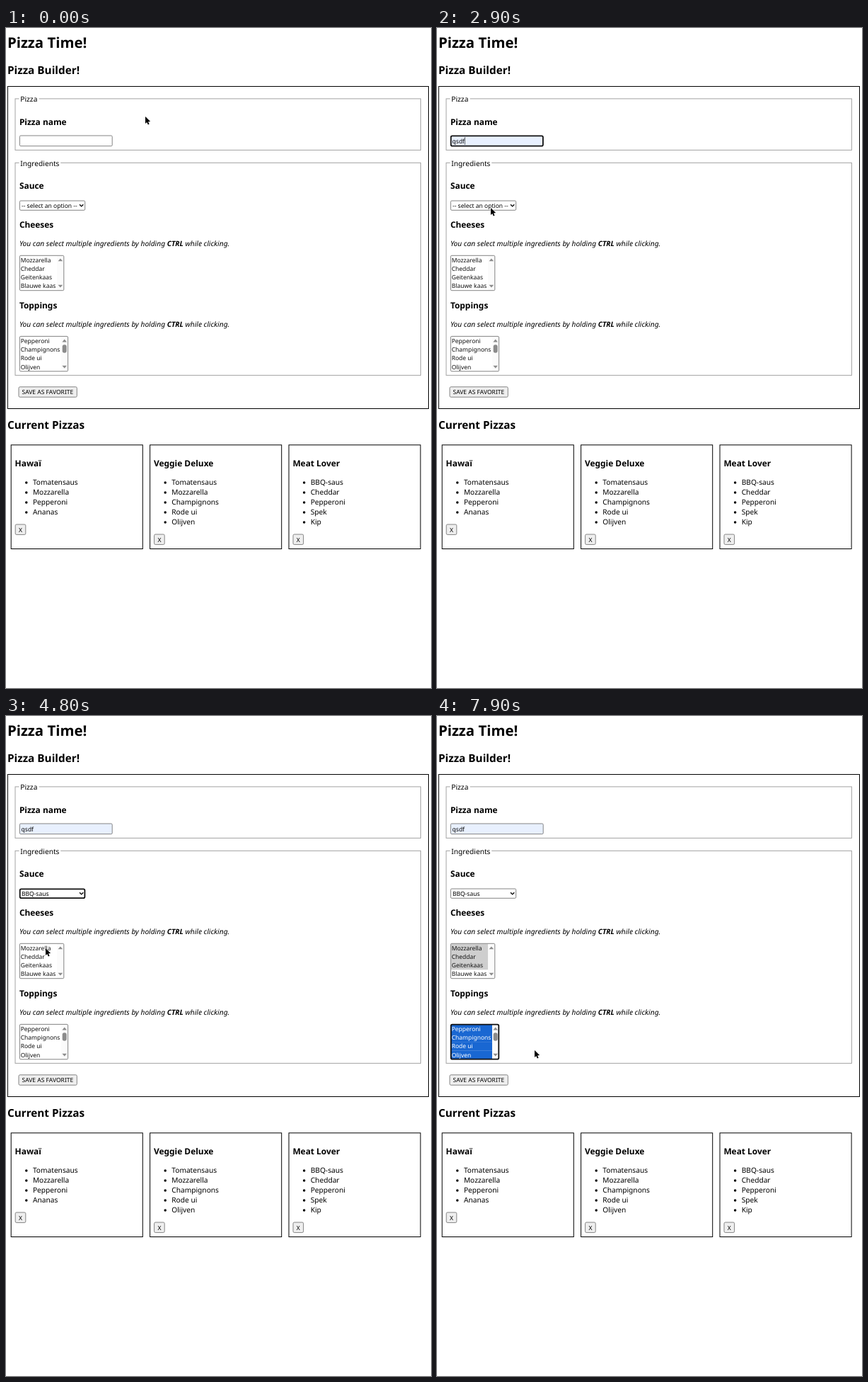
An HTML page that plays this animation: 601x932 px, repeating every 8000 ms.

```html
<!DOCTYPE html>
<html lang="en">
<head>
<meta charset="utf-8">
<title>Pizza Time!</title>
<style>
  html, body { margin: 0; width: 100%; height: 100%; overflow: hidden; background: #fff; }
  svg { display: block; width: 100%; height: 100%; }
  text { font-family: "Noto Sans", "Open Sans", sans-serif; font-size: 10.18px; text-rendering: geometricPrecision; white-space: pre; }
  .h1 { font-size: 20.4px; font-weight: 700; }
  .h2 { font-size: 15.3px; font-weight: 700; }
  .h3 { font-size: 11.92px; font-weight: 700; }
  .ui { font-size: 8.5px; }
  .sug { font-size: 8.95px; font-weight: 500; fill: #1f1f24; }
  .it { font-style: italic; }
  .b { font-weight: 700; }
</style>
</head>
<body>
<svg id="stage" viewBox="0 0 601 932" preserveAspectRatio="none">
  <defs>
    <filter id="shadow" x="-10%" y="-10%" width="120%" height="120%">
      <feDropShadow dx="0" dy="0.8" stdDeviation="1.3" flood-opacity="0.28"/>
    </filter>
  </defs>
  <g id="page"></g>
  <g id="live"></g>
</svg>
<script>
const LOOP = 8000, STEP = 100;
const BLUE = '#1967d2', GREY = '#767676';
const page = document.getElementById('page');
const live = document.getElementById('live');

const text = (x, y, s, cls = '', extra = '') => `<text x="${x}" y="${y}" class="${cls}" ${extra}>${s}</text>`;
const rect = (x, y, w, h, fill, extra = '') => `<rect x="${x}" y="${y}" width="${w}" height="${h}" fill="${fill}" ${extra}/>`;
const box = (x, y, w, h, fill, stroke, rx = 0, sw = 1) =>
  rect(x, y, w, h, fill, `stroke="${stroke}" stroke-width="${sw}" rx="${rx}"`);
const path = (d, extra) => `<path d="${d}" ${extra}/>`;

// Form control frame, with a heavy ring when focused
const control = (x, y, w, h, focused, fill = '#fff') =>
  focused ? box(x + 0.3, y + 0.3, w - 0.6, h - 0.4, fill, '#101010', 1.9, 1.8)
          : box(x, y, w, h, fill, GREY, 1.5, 0.9);

const button = (x, y, w, label, tx) =>
  box(x, y, w, 14.4, '#efefef', GREY, 1.7, 0.9) + text(tx, y + 10.5, label, 'ui');

const fieldset = (y, h, label, gap) =>
  box(13, y, 573.4, h, 'none', '#a3a3a3') + rect(18.6, y - 3, gap, 6, '#fff') + text(20.3, y + 4.2, label);

const hint = y => text(18.9, y,
  'You can select multiple ingredients by holding <tspan class="b">CTRL</tspan> while clicking.', 'it');

function card(i, title, items) {
  const x = 7.2 + i * 196.4;
  const list = items.map((s, n) => {
    const y = 645.4 + n * 14;
    return `<circle cx="${x + 21.6}" cy="${y - 3.4}" r="1.75"/>` + text(x + 30.7, y, s);
  }).join('');
  const by = 645.4 + items.length * 14 - 0.4;
  return box(x, 588.8, 186.1, 146.7, '#fff', '#000') + text(x + 5.4, 619.3, title, 'h3') +
    list + button(x + 6, by, 14.6, 'X', x + 10.8);
}

page.innerHTML =
  text(1.9, 28.2, 'Pizza Time!', 'h1') +
  text(1.9, 64.9, 'Pizza Builder!', 'h2') +
  box(2.4, 82.5, 595.1, 455, '#fff', '#000') +
  fieldset(99.9, 72.5, 'Pizza', 28) +
  fieldset(190.4, 300, 'Ingredients', 58.6) +
  text(18.9, 136.6, 'Pizza name', 'h3') +
  text(18.9, 227.4, 'Sauce', 'h3') +
  text(18.9, 281.6, 'Cheeses', 'h3') + hint(307.9) +
  text(18.9, 395.6, 'Toppings', 'h3') + hint(421.9) +
  button(18, 506.8, 82.3, 'SAVE AS FAVORITE', 22.5) +
  text(1.9, 566.3, 'Current Pizzas', 'h2') +
  card(0, 'Hawaï', ['Tomatensaus', 'Mozzarella', 'Pepperoni', 'Ananas']) +
  card(1, 'Veggie Deluxe', ['Tomatensaus', 'Mozzarella', 'Champignons', 'Rode ui', 'Olijven']) +
  card(2, 'Meat Lover', ['BBQ-saus', 'Cheddar', 'Pepperoni', 'Spek', 'Kip']);

// Pointer track: time, x, y
const track = [
  [400, 197, 125], [500, 160, 138], [600, 103.5, 154], [1700, 103.5, 154],
  [1800, 133, 176], [1900, 153, 193], [2200, 150, 196], [2500, 98, 238],
  [2700, 76, 254], [3000, 76, 254], [3200, 73, 274], [3500, 68, 295],
  [3900, 68, 295], [4300, 62, 313], [4700, 56, 328], [4900, 56, 328],
  [5200, 52, 339], [5500, 50, 352], [5600, 49.5, 355], [5700, 55, 364],
  [6000, 75, 389], [6200, 75, 389], [6300, 75, 408], [6600, 66, 440], [6800, 64, 443],
  [7000, 64, 445], [7200, 62, 453], [7400, 61, 465], [7600, 62, 475],
  [7800, 101.5, 474], [7900, 138, 472]
];

function pointer(t) {
  if (t <= track[0][0]) return track[0].slice(1);
  const i = track.findIndex(p => p[0] >= t);
  const [t0, x0, y0] = track[i - 1], [t1, x1, y1] = track[i];
  const k = (t - t0) / (t1 - t0);
  return [x0 + (x1 - x0) * k, y0 + (y1 - y0) * k];
}

const arrow = (x, y) => path('M0 0V10L2.2 8L3.8 11.6L5.6 10.8L4 7.4L7.1 7.1Z',
  `transform="translate(${x} ${y})" stroke="#fff" stroke-width="1.1" paint-order="stroke" stroke-linejoin="round"`);

const beam = (x, y) => path(
  `M${x - 2.2} ${y - 5.4}H${x - 0.6}L${x} ${y - 4.8}L${x + 0.6} ${y - 5.4}H${x + 2.2}` +
  `M${x} ${y - 4.8}V${y + 5}M${x - 2.2} ${y + 5.5}H${x - 0.6}L${x} ${y + 5}L${x + 0.6} ${y + 5.5}H${x + 2.2}`,
  'fill="none" stroke="#333" stroke-width="0.9"');

function nameField(t) {
  const focused = t >= 700 && t < 3000, filled = t >= 1900;
  let s = control(19.4, 152, 130.8, 14.7, focused, filled ? '#e8f0fe' : '#fff');
  if (filled) s += text(21.6, 162.6, 'qsdf', 'ui');
  if (focused && (t < 1800 || t >= 2200)) s += rect(filled ? 39.1 : 21.9, 154, 0.7, 10.8, '#333');
  return s;
}

function suggestions(t) {
  if (t < 900 || t >= 2200) return '';
  const names = ['qsdf', 'test', 'OLVAR T630', 'mlflow_db', 'prefect', 'Canada'];
  return path('M73 173.5H79L83.7 168.8L88.4 173.5H169Q171 173.5 171 175.5V315Q171 317 169 317H73Q71 317 71 315V175.5Q71 173.5 73 173.5Z',
      'fill="#fdf8fe" filter="url(#shadow)"') +
    (t >= 1900 ? rect(71, 175.6, 100, 22.9, '#f6f1f8') : '') +
    names.map((s, i) => text(79, 190.4 + i * 22.95, s, 'sug')).join('');
}

function sauce(t) {
  return control(19.4, 244, 92.3, 13.3, t >= 3000 && t < 4900) +
    text(21.9, 253.7, t < 3900 ? '-- select an option --' : 'BBQ-saus', 'ui') +
    path('M104.1 249.2L106.7 251.9L109.3 249.2', 'fill="none" stroke="#000" stroke-width="1.3"');
}

function sauceMenu(t, py) {
  if (t < 3000 || t >= 4100) return '';
  const alpha = t < 3900 ? 1 : t < 4000 ? 0.65 : 0.2;
  const hover = Math.floor((py - 258.4) / 16.4);
  const rows = ['-- select an option --', 'Tomatensaus', 'BBQ-saus', 'Witte knoflooksaus'].map((s, i) => {
    const on = i > 0 && i === hover, y = 258.4 + i * 16.4;
    const fill = on ? '#fff' : i ? '#222' : '#8f8f8f';
    return (on ? rect(19.6, y, 92, 16.4, BLUE) : '') + text(21.9, y + 11.5, s, 'ui', `fill="${fill}"`);
  }).join('');
  return `<g opacity="${alpha}">${box(19.5, 258, 92.2, 66.5, '#efefef', '#9a9a9a', 0, 0.8)}${rows}</g>`;
}

// Multi-select list; picks holds the click time of each row
function listBox(t, y, w, items, picks, from, to, thumb) {
  const focused = t >= from && t < to, right = 19.4 + w, sx = right - 4.9;
  let s = rect(19.4, y, w, 49.4, '#fff');
  items.forEach((label, i) => {
    const on = t >= picks[i], ry = y + 0.5 + i * 12.12;
    if (on) s += rect(20, ry, w - 10.2, 12.2, focused ? BLUE : '#cecece');
    s += text(20.7, ry + 9.3, label, 'ui', `fill="${on && focused ? '#fff' : '#101010'}"`);
  });
  s += rect(right - 9.6, y + 0.5, 9.2, 48.4, '#fbfbfb');
  s += path(`M${sx - 3.3} ${y + 8}h6.6l-3.3 -3.8zM${sx - 3.3} ${y + 41.4}h6.6l-3.3 3.8z`, 'fill="#8b8b8b"');
  if (thumb) s += rect(sx - 3, y + 11.8, 6, 11.6, '#8b8b8b', 'rx="2.8"');
  return s + control(19.4, y, w, 49.4, focused, 'none');
}

function draw(t) {
  const [x, y] = pointer(t);
  live.innerHTML =
    nameField(t) + sauce(t) +
    listBox(t, 321.3, 62.4, ['Mozzarella', 'Cheddar', 'Geitenkaas', 'Blauwe kaas'],
      [4900, 5200, 5500, LOOP], 4900, 6700, false) +
    listBox(t, 435.4, 68.2, ['Pepperoni', 'Champignons', 'Rode ui', 'Olijven'],
      [6700, 7200, 7400, 7600], 6700, LOOP, true) +
    suggestions(t) + sauceMenu(t, y) +
    (t >= 600 && t < 1800 ? beam(x, y) : arrow(x, y));
}

let start, last = -1;
function tick(now) {
  start ??= now;
  const t = Math.floor(((now - start) % LOOP) / STEP) * STEP;
  if (t !== last) draw(last = t);
  requestAnimationFrame(tick);
}
draw(0);
requestAnimationFrame(tick);
</script>
</body>
</html>
```
